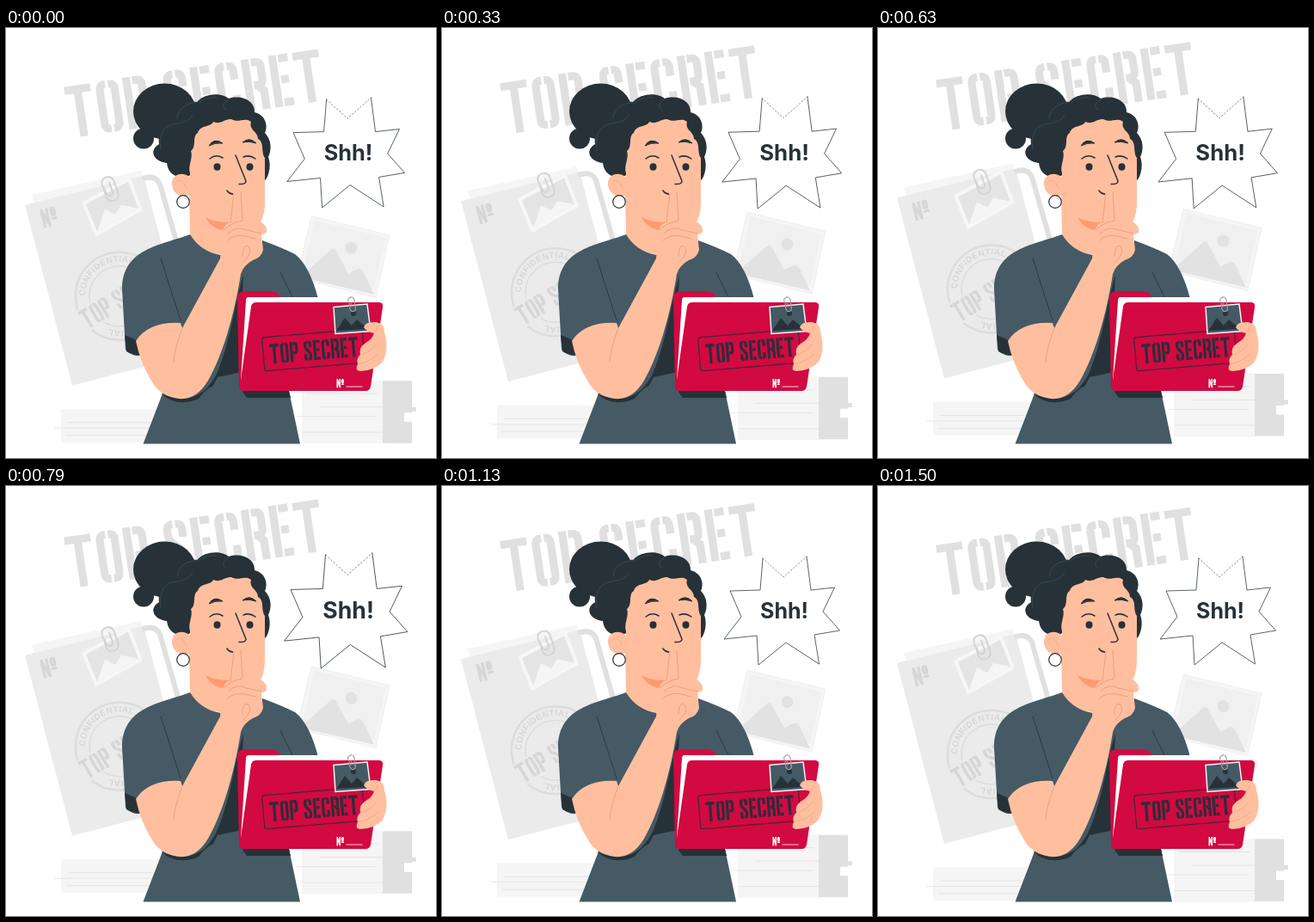
An HTML page that plays this animation: 500x500 px, repeating every 1.54 s.

```html
<!DOCTYPE html>
<html lang="en">
<head>
<meta charset="utf-8">
<title>Top secret</title>
<style>
  html, body { margin: 0; width: 100%; height: 100%; overflow: hidden; background: #fff; }
  svg { display: block; width: 100vw; height: 100vh; }
  .line { fill: none; stroke-linecap: round; stroke-linejoin: round; }
  .letters { fill: none; stroke-width: 9; }
  .stamp { font: bold 10px "Liberation Sans", Arial, sans-serif; letter-spacing: .4px; }
  .shout { font: 700 25px Inter, "Open Sans", sans-serif; }
</style>
</head>
<body>
<svg viewBox="0 0 500 500">
  <g id="backdrop">
    <g class="letters" data-text="TOP SECRET" stroke="#e0e0e0" transform="translate(67 68.5) rotate(-8.5) scale(1.022 1.01)"></g>

    <!-- papers -->
    <path d="M30 194L157 166L200 330L80 360Z" fill="#f5f5f5"/>
    <path d="M22 206L160 172L215 380L77 416Z" fill="#ebebeb"/>
    <path d="M163 180L172 177L192 243L196 260H184Z" fill="#fff"/>
    <path class="line" d="M161 175Q174 171 179 182L200 255" stroke="#e0e0e0" stroke-width="6"/>
    <g class="letters" data-text="No" stroke="#d6d6d6" transform="translate(39 212) rotate(-14) scale(.36)"></g>
    <g fill="none" stroke="#dcdcdc">
      <circle cx="132" cy="312" r="51" stroke-width="2.5"/>
      <circle cx="132" cy="312" r="35" stroke-width="1.5"/>
    </g>
    <path id="ring" d="M92 312A40 40 0 0 1 172 312A40 40 0 0 1 92 312" fill="none"/>
    <g class="stamp" fill="#d6d6d6">
      <text><textPath href="#ring">CONFIDENTIAL</textPath></text>
      <text><textPath href="#ring" startOffset="122">CONFIDENTIAL</textPath></text>
    </g>
    <path d="M76 333L150 287L165 311L91 357Z" fill="#ebebeb"/>
    <g class="letters" data-text="TOP SECRET" stroke="#d6d6d6" transform="translate(83 331) rotate(-31) scale(.39)"></g>
    <path d="M88 203L144 173L159 212L104 243Z" fill="#f7f7f7"/>
    <path d="M93 205L142 179L154 210L106 237Z" fill="#e4e4e4"/>
    <path d="M106 237L115 211L127 217L134 206L154 210Z" fill="#f5f5f5"/>
    <path class="line" d="M113 185L117 198Q121 204 128 200Q132 197 130 191L125 177Q121 171 114 175Q110 178 112 184L117 193Q120 197 123 194Q125 192 123 188L120 180" stroke="#d4d4d4" stroke-width="2"/>

    <!-- loose photo -->
    <path d="M355 219L446 241L430 314L338 291Z" fill="#f5f5f5" stroke="#ededed" stroke-width=".8"/>
    <path d="M359 224L441 244L428 304L345 285Z" fill="#f0f0f0"/>
    <path d="M342 290L378 258Q382 255 384 260L398 286L408 281Q412 279 415 283L428 310Z" fill="#e2e2e2"/>
    <circle cx="401.500" cy="256" r="7" fill="#e2e2e2"/>

    <!-- books -->
    <path d="M64 443.500H180V482H64ZM344 410H438V483.500H344Z" fill="#f5f5f5"/>
    <path class="line" d="M72 459H170M57 465.500H170M70 474H170M350 425.500H432M365 441H448M338 452H430M345 470.500H438" stroke="#e2e2e2" stroke-width=".9"/>
    <path d="M438 410.500H472V441H477V446H472V447.500H463V458H472V483H438Z" fill="#e0e0e0"/>
  </g>

  <g id="bubble">
    <path d="M328 178L348 152L335 122L370 121L373 84L397 106L424 82L429 121L456.500 118L443 146L462.500 168L433 173L438.500 207L400 182L368 208L366 174Z" fill="#fff"/>
    <path class="line" d="M373 84L370 121L335 122L348 152L328 178L366 174L368 208L400 182L438.500 207L433 173L462.500 168L443 146L456.500 118L429 121L424 82" stroke="#263238" stroke-width=".75"/>
    <path class="line" d="M373 84L397 106L424 82" stroke="#263238" stroke-width=".55" stroke-dasharray="1.500 2.500"/>
    <text class="shout" x="398" y="153.500" text-anchor="middle" fill="#263238">Shh!</text>
  </g>

  <!-- hair -->
  <g fill="#263238">
    <ellipse cx="184.500" cy="97" rx="36.500" ry="32.500"/>
    <circle cx="160" cy="128.500" r="12"/>
    <path d="M216 170C207 176 189 175 187 157C171 155 166 142 178 135C176 119 187 109 197 106C195 92 211 84 222 86C232 75 251 75 259 82C274 77 290 85 289 98C302 101 305 114 301 122C309 130 309 142 305 150C309 161 305 175 300 178Z"/>
  </g>
  <path class="line" d="M180 142C177 121 185 112 199 111Q214 109 217 101M199 105C199 94 211 86 222 87M224 87Q234 79 245 81M259 83Q248 88 256 96" stroke="#46565e" stroke-width=".6"/>

  <!-- head and neck -->
  <g fill="#ffbf9f">
    <path d="M214 169C211 160 218 151 215 143C222 138 216 126 223 122C226 112 238 116 241 109C249 113 255 105 262 106C270 111 278 103 285 109C282 119 293 120 293 129C301 133 296 144 301 151V203C301 221 294 230 287 239L298 248Q295 267 248 263Q224 259 214 241L213 193Z"/>
    <path d="M214 174C206 166 192 170 193 182C194 194 205 198 215 194Z"/>
  </g>
  <path d="M232 220Q246 228 268 225L260 235Q241 237 232 220Z" fill="#ff9a70"/>
  <path class="line" d="M198 178Q206 175 210 186" stroke="#f0a487" stroke-width=".8"/>
  <circle cx="206" cy="202" r="7.300" fill="none" stroke="#263238" stroke-width="1.200"/>
  <g fill="#263238">
    <ellipse cx="245.500" cy="161.500" rx="4" ry="4.200"/>
    <ellipse cx="283.500" cy="161.500" rx="4" ry="4.200"/>
    <path d="M236 137Q242 127 252 134Q243 133 236 137ZM275 133Q283 126 291 134Q282 131 275 133Z" stroke="#263238"/>
  </g>
  <path class="line" d="M237 152Q244 146 252 151M276 150Q283 147 290 152M267 148L279 178Q279 182 271 181.500M257 189Q260 194 268 193" stroke="#263238" stroke-width="1.500"/>

  <!-- shirt -->
  <path d="M214 240C180 253 135 256 135 304L139 374Q148 384 160 380L182 425L159.500 483.500H342L329 422L363 315Q353 276 336 263Q320 255 298 247C300 264 273 264 250 264Q226 260 214 240Z" fill="#455a64"/>
  <path d="M138 357L152 363L160 380Q147 381 140 376ZM180 425Q222 444 244 404C260 369 263 333 276 287L270 422H329L331 430H280L274 422Q245 402 224 431Q199 442 180 425Z" fill="#263238"/>
  <path d="M274 400L246 406Q235 430 216 436H276Z" fill="#455a64"/>
  <path class="line" d="M180 268L203 340M319 284L333 313" stroke="#263238" stroke-width=".8"/>

  <!-- folder -->
  <path d="M269 316Q269 306 277 306H308Q315 306 319 313L300 400L271 420Z" fill="#d20a41"/>
  <path d="M282 313H388L384 330L273 409L279 317Q279 313 282 313Z" fill="#fff"/>
  <path d="M291 319H434Q439 319 438 325L424 417Q423 422 418 422H276Q271 422 272 416L285 324Q286 319 291 319Z" fill="#d20a41"/>
  <rect x="299" y="355" width="117" height="39" rx="3" transform="rotate(-4.800 357.500 374.500)" fill="none" stroke="#472536" stroke-width="1.200"/>
  <g class="letters" data-text="TOP SECRET" stroke="#2c2d38" transform="translate(306 367.500) rotate(-4.800) scale(.351 .385)"></g>
  <g class="letters" data-text="No" stroke="#fff" transform="translate(384.500 408) scale(.17)"></g>
  <path d="M395.500 417H414.500" stroke="#fff" stroke-width=".8"/>
  <path d="M381 324.500L420 321L424 352.500L383 355.500Z" fill="#455a64" stroke="#f5f5f5" stroke-width="1.500"/>
  <path d="M384 352L394 337L402 346L408 339L421 350Z" fill="#263238"/>
  <circle cx="404" cy="332" r="3" fill="#263238"/>
  <path class="line" d="M399 320L400 327Q402 331 405 329Q407 328 406 324L405 316Q403 311 399 314Q397 315 398 319M402 324L401 319" stroke="#a0a0a0" stroke-width="1.200"/>
  <path d="M416 348Q418 341 430 342Q440 343 440 354Q446 373 438 388Q430 398 412 399Q405 398 409 391Q407 384 412 380Q410 372 417 367Q426 362 428 355Q419 353 416 348Z" fill="#ffbf9f"/>
  <path class="line" d="M428 355Q432 352 432 347M412 380Q424 377 430 368M409 391Q424 388 433 379" stroke="#f0a487" stroke-width=".9"/>

  <!-- raised arm -->
  <path d="M151 364Q166 341 203 343L205 349L249 268L252 236Q254 227 261 226L264 193Q267 185 273 191L275 223L296 225Q304 230 303 237Q301 240 297 240L299 258Q297 267 287 270Q276 276 273 286C265 337 251 382 235 410Q221 433 201 431Q178 428 169 410Q156 389 151 364Z" fill="#ffbf9f"/>
  <path class="line" d="M195 388Q196 372 205 349M261 226L265 192M275 223L273 191M253 235Q262 226 275 224M258 239Q268 229 280 235L297 239M257 247Q267 239 278 242L290 245M275 265Q275 254 280 253Q285 256 283 263Q280 269 276 272" stroke="#ec9a7c" stroke-width=".9"/>
</svg>
<script>
const LEFT = "M11.5 4.5H10Q4.500 4.500 4.500 11V49Q4.500 55.500 10 55.500H11.500";
const glyphs = {
  T: [30, "M0 5H30M15 5V60"],
  O: [26, LEFT + "M14.5 4.5H16Q21.5 4.5 21.5 11V49Q21.5 55.5 16 55.5H14.5"],
  P: [26, "M4.5 0V60M11 4.5H16Q21.5 4.5 21.5 11V26Q21.5 33 16 33H11"],
  S: [26, "M21.5 20V11Q21.5 4.5 16 4.5H14.5M11.5 4.5H10Q4.5 4.5 4.5 11V16Q4.5 22 9 26L17 34Q21.5 38 21.5 44V49Q21.5 55.5 16 55.5H14.5M11.5 55.5H10Q4.5 55.5 4.5 49V40"],
  E: [22, "M4.5 0V60M11 4.5H22M11 29H20M11 55.5H22"],
  C: [26, LEFT + "M14.5 4.5H16Q21.5 4.5 21.5 11V21M14.5 55.5H16Q21.5 55.5 21.5 49V39"],
  R: [26, "M4.5 0V60M11 4.5H16Q21.5 4.5 21.5 11V24Q21.5 31 16 31H11M16 33L21.5 38V60"],
  N: [26, "M4.5 0V60M4.5 4L21.5 56M21.5 0V60"],
  o: [18, "M4 9Q4 4 9 4T14 9V21Q14 26 9 26T4 21ZM0 37H18"],
  " ": [9, ""]
};

// Stencil lettering
for (const group of document.querySelectorAll("[data-text]")) {
  let x = 0;
  group.setAttribute("aria-label", group.dataset.text);
  group.innerHTML = [...group.dataset.text].map(char => {
    const [width, d] = glyphs[char];
    const path = `<path d="${d}" transform="translate(${x})"/>`;
    x += width + 5.5;
    return path;
  }).join("");
}

const LOOP = 1540, PHASE = 23;
const beat = [[0, 1], [.1, 1.1], [.3, 1], [.4, 1], [.5, 1.1], [.6, 1], [1, 1]];

function lerpKeys(keys, u) {
  const i = Math.max(1, keys.findIndex(([at]) => at >= u));
  const [u0, v0] = keys[i - 1], [u1, v1] = keys[i];
  return v0 + (v1 - v0) * (u - u0) / (u1 - u0);
}

const backdrop = document.getElementById("backdrop");
const bubble = document.getElementById("bubble");
const start = performance.now();

function draw() {
  const t = (performance.now() - start) % LOOP;
  const u = Math.min(1, (t + PHASE) / (1500 + PHASE));
  const lift = 10 * (1 - Math.abs(2 * u - 1));
  backdrop.setAttribute("transform", `translate(0 ${-lift})`);
  bubble.setAttribute("transform",
    `translate(395.5 145) scale(${lerpKeys(beat, u)}) translate(-395.5 -145)`);
  requestAnimationFrame(draw);
}
draw();
</script>
</body>
</html>
```
